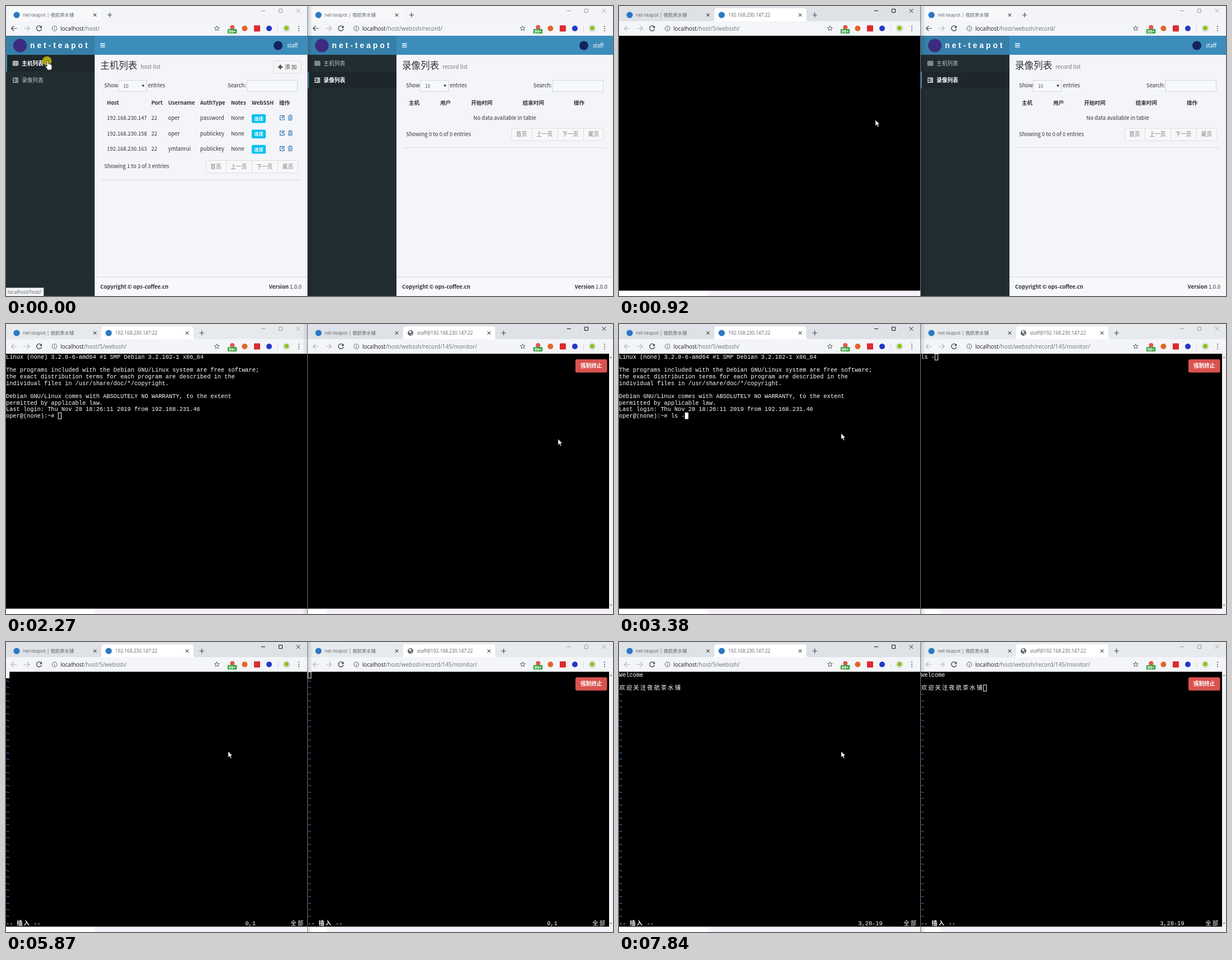
Write an HTML page that moves like this. It is 1082 px wide and 517 px high and loops after 8 s.

```html
<!DOCTYPE html>
<html lang="zh">
<head>
<meta charset="utf-8">
<title>Web terminal</title>
<style>
html, body { margin: 0; width: 100%; height: 100%; overflow: hidden; background: #fff; }
svg { display: block; width: 100%; height: 100%; }
text { white-space: pre; font: 9.5px "Noto Sans CJK SC", "Noto Sans CJK JP", "Noto Sans CJK", sans-serif; }
.ui { font-family: "Open Sans", "Noto Sans CJK SC", "Noto Sans CJK JP", sans-serif; }
.brand { font-family: "Liberation Sans", sans-serif; font-weight: 700; letter-spacing: 4px; }
.mono { font: 10.3px "Liberation Mono", "Noto Sans CJK SC", "Noto Sans CJK JP", monospace; }
.wide { letter-spacing: 2.06px; }
.b { font-weight: 700; }
.l { font-weight: 300; }
</style>
</head>
<body>
<svg id="stage" viewBox="0 0 1082 517" preserveAspectRatio="none"></svg>
<script>
const LOOP = 8000, SPLIT = 538, CELL = 6.18, ROW = 11.65;
const BRAND = 'net-teapot', CLUB = '夜航茶水铺', USER = 'staff', HOST = '192.168.230.147';
const PROMPT = 'oper@(none):~# ', FILE = 'ops-coffee', GREETING = '欢迎关注' + CLUB;
const PINYIN = "huan'ying'guan'zhu'ye'hang'cha'shui'pu".split("'");

const BANNER = [
  'Linux (none) 3.2.0-6-amd64 #1 SMP Debian 3.2.102-1 x86_64',
  '',
  'The programs included with the Debian GNU/Linux system are free software;',
  'the exact distribution terms for each program are described in the',
  'individual files in /usr/share/doc/*/copyright.',
  '',
  'Debian GNU/Linux comes with ABSOLUTELY NO WARRANTY, to the extent',
  'permitted by applicable law.',
  'Last login: Thu Nov 28 18:26:11 2019 from 192.168.231.46'
];

// time, x, y, shape: 0 arrow, 1 hand, 2 hand while clicking, 3 arrow while clicking
const POINTER = [
  [0, 73, 98, 2], [90, 73, 98, 1], [160, 95, 108, 1], [230, 180, 130, 0], [300, 310, 165, 0],
  [370, 415, 192, 0], [440, 451, 199, 1], [590, 451, 199, 2], [670, 451, 199, 0], [750, 457, 203, 0],
  [1070, 470, 200, 0], [1150, 520, 180, 0], [1230, 575, 155, 0], [1300, 602, 138, 0], [1380, 612, 130, 1],
  [1460, 612, 130, 2], [1530, 660, 100, 0], [1600, 709, 69, 2], [1660, 712, 69, 1], [1730, 720, 70, 0],
  [1810, 775, 95, 0], [1880, 860, 140, 0], [1960, 940, 185, 0], [2040, 982, 203, 1], [2110, 984, 204, 2],
  [2190, 984, 205, 0], [2350, 960, 206, 0], [2430, 850, 204, 0], [2520, 700, 202, 0], [2600, 570, 200, 0],
  [2820, 396, 195, 3], [2890, 396, 195, 0]
];
const SIDEBAR = [[0, 158], [1640, 115], [1730, 84], [1810, 50], [1880, 34]];
const LIST_CMD = [[0, ''], [3120, 'l'], [3290, 'ls'], [3370, 'ls -'], [3460, 'ls -lh']];
const EDIT_CMD = [[0, ''], [4240, 'v'], [4320, 'vi '], [4470, 'vi o'], [4540, 'vi ops']];
[...'-coffee'].forEach((c, i) => EDIT_CMD.push([4760 + i * 81, EDIT_CMD.at(-1)[1] + c]));
const WELCOME = [[0, ''], [6010, 'W'], [6180, 'We'], [6258, 'Wel'], [6335, 'Welc'], [6412, 'Welco'], [6490, 'Welcome']];

const at = (table, t) => table.findLast(k => k[0] <= t);
const rect = (x, y, w, h, fill, more = '') => `<rect x="${x}" y="${y}" width="${w}" height="${h}" fill="${fill}" ${more}/>`;
const dot = (x, y, r, fill, more = '') => `<circle cx="${x}" cy="${y}" r="${r}" fill="${fill}" ${more}/>`;
const line = (d, color, w = 1) => `<path d="${d}" fill="none" stroke="${color}" stroke-width="${w}"/>`;
const shape = (d, fill, more = '') => `<path d="${d}" fill="${fill}" ${more}/>`;
const text = (x, y, s, fill = '#333', size = 9.5, cls = '', anchor = 'start') =>
  `<text x="${x}" y="${y}" fill="${fill}" class="${cls}" style="font-size:${size}px" text-anchor="${anchor}">${s}</text>`;
const move = (x, y, s) => `<g transform="translate(${x} ${y})">${s}</g>`;
const cross = (x, y, r, color, w = 1) => line(`M${x - r} ${y - r}l${2 * r} ${2 * r}m0 ${-2 * r}l${-2 * r} ${2 * r}`, color, w);
const plus = (x, y, r, color, w = 1.2) => line(`M${x - r} ${y}h${2 * r}M${x} ${y - r}v${2 * r}`, color, w);

function star(x, y) {
  const p = [...Array(10)].map((_, i) => {
    const a = i * Math.PI / 5, r = i % 2 ? 2 : 4.6;
    return `${(x + r * Math.sin(a)).toFixed(1)} ${(y - r * Math.cos(a)).toFixed(1)}`;
  });
  return line(`M${p.join('L')}Z`, '#5f6368', 1);
}

// Browser frame: tab strip, window buttons, toolbar
function chrome(W, o) {
  const strip = o.active ? '#dee1e6' : o.pale ? '#f2f4f7' : '#e7eaed';
  const btn = o.active ? '#111' : '#999', ink = '#45494d', off = '#b4b7ba';
  const tx = o.second ? 170 : 6, r = W - 537;
  let s = rect(0, 0, W, 53, '#f3f5f8') + rect(0, 0, W, 27, strip);
  s += shape(`M${tx - 4} 27q4 0 4 -4v-14q0 -5 5 -5h154q5 0 5 5v14q0 4 4 4z`, o.pale && !o.active ? '#f7f8fa' : '#fff');
  s += dot(19, 16, 5.6, '#2b78c5') + text(30, 19, `${BRAND} | ${CLUB}`, '#5f6368', 8.3, 'ui') + cross(158.5, 16, 2.7, ink, 1.1);
  if (o.second) {
    s += o.globe ? dot(183, 16, 5, '#5f6368') + shape('M180 13l3 -1 2 2 -3 3zM183 18l3 -1 -1 3z', '#fff') : dot(183, 16, 5.6, '#2b78c5');
    s += text(194.5, 19, o.second, '#5f6368', 8.3, 'ui') + cross(323, 16, 2.7, ink, 1.1);
  }
  s += plus(o.second ? 349 : 185, 16, 4.2, ink);
  s += line(`M${W - 82} 8.5h7`, btn) + line(`M${W - 50.5} 5.5h6v6h-6z`, btn) + cross(W - 16, 8.5, 3.4, btn, .9);
  const arrow = (x, d, c) => line(`M${x + 5 * d} 40h${-10 * d}m${4.5 * d} -4.5l${-4.5 * d} 4.5 ${4.5 * d} 4.5`, c, 1.2);
  s += arrow(14.5, 1, o.second ? off : ink) + arrow(37, -1, off);
  s += line('M62.7 37.2a4.5 4.5 0 1 0 .8 3.6', ink, 1.3) + shape('M64 35v4.3h-4.3z', ink);
  s += dot(86.5, 40, 4.4, 'none', 'stroke="#5f6368"') + rect(86, 39.4, 1.1, 3, '#5f6368') + rect(86, 37.4, 1.1, 1.1, '#5f6368');
  s += text(97, 43.5, `localhost<tspan fill="#6b7075">${o.path}</tspan>`, '#202124', 10, 'ui');
  s += move(r, 0, star(376, 40) + dot(403.5, 38, 4, '#e2574c') + rect(395, 41, 16.5, 8, '#3ba345', 'rx="1.5"') +
    text(403.2, 47.8, '99+', '#fff', 7.6, 'ui b', 'middle') + dot(425.5, 40, 5, '#e2662a') + rect(442, 34.5, 11, 11, '#dd2a30', 'rx="1"') +
    dot(469, 40, 5, '#2238c8') + rect(484, 35, 1, 11, '#d5d8db') + dot(500, 40, 6.8, '#dfe2e4') + dot(500, 39.5, 4, '#8fc31f') +
    [36, 40, 44].map(y => dot(522, y, 1.1, '#5f6368')).join(''));
  return s;
}

const gridIcon = c => line('M12.5 98.5h9v7.5h-9zM12.5 101h9M12.5 103.5h9M15.5 98.5v7.5M18.5 98.5v7.5', c, 1);
const indentIcon = c => line('M12 128.5h10M16.5 131h5.5M16.5 133.5h5.5M12 136h10', c, 1.3) + shape('M12 130l3 2.2 -3 2.3z', c);
const button = (x, y, w, label, fill) => rect(x, y, w, 15.5, fill, 'rx="2"') + text(x + w / 2, y + 10.8, label, '#fff', 8.2, 'b', 'middle');

// Layout shared by both lists
function listPage(W, side, o) {
  const x = side, full = side === 158, px = W - 181, py = o.pageY;
  let s = rect(0, 53, W, 464, '#f4f5f9') + rect(0, 53, W, 34, '#3c8dbc') + rect(0, 53, side, 34, '#367fa9') + rect(0, 87, side, 430, '#222d32');
  s += dot(full ? 25 : side / 2, 70.5, 12, '#3d2b80');
  if (full) s += text(43, 75, BRAND, '#fff', 13.75, 'brand');
  s += line(`M${x + 10} 67.3h8.5m-8.5 2.9h8.5m-8.5 2.9h8.5`, '#fff', 1.4);
  s += dot(W - 52, 70.5, 8, '#14235c') + text(W - 36, 73.7, USER, '#fff', 9.6);
  s += rect(0, o.item ? 117 : 87, side, 30, '#1e282c') + rect(0, o.item ? 117 : 87, 2, 30, '#3c8dbc');
  const tint = i => i === o.item ? '#fff' : '#b8c7ce';
  s += gridIcon(tint(0)) + indentIcon(tint(1));
  if (full) ['主机列表', '录像列表'].forEach((n, i) => s += text(28, 105.7 + 30 * i, n, tint(i), 9.7, i === o.item ? 'b' : ''));
  s += text(x + 10, 112, o.title, '#333', 16.5) + text(x + 82, 111.8, o.sub, '#777', 9.7, 'l');
  s += text(x + 17, 145, 'Show') + rect(x + 42.5, 132.5, 50, 20, '#f7f8fb', 'stroke="#d2d6de"') + text(x + 51, 146.2, '10', '#555', 8.3);
  s += shape(`M${x + 84} 140.5h5l-2.5 4z`, '#333') + text(x + 95, 145, 'entries');
  s += text(W - 142, 145, 'Search:') + rect(W - 107.5, 132.5, 90, 20, '#f7f8fb', 'stroke="#d2d6de"');
  s += text(x + 17, py + 14.2, o.info) + rect(px + .5, py + .5, 163.5, 22, '#f8f8fa', 'stroke="#ddd" rx="2"');
  s += line(`M${px + 36.5} ${py}v22m46 0v-22m46 0v22`, '#ddd');
  ['首页', '上一页', '下一页', '尾页'].forEach((n, i) => s += text(px + [18, 59, 105, 146.5][i], py + 14.5, n, '#777', 9.7, '', 'middle'));
  s += rect(x + 11, py + 34.5, W - x - 22, 1, '#d8dbe2') + rect(x, 483, W - x, 34, '#f7f8fb') + rect(x, 483, W - x, 1, '#d2d6de');
  s += text(x + 10, 503.5, 'Copyright © ops-coffee.cn', '#333', 9.5, 'b') +
    text(W - 10, 503.5, '<tspan font-weight="700">Version</tspan> 1.0.0', '#333', 9.5, '', 'end');
  return s;
}

const status = (w, s) => rect(0, 502.5, w, 15, '#f3f4f6', 'stroke="#c8cbd0" stroke-width=".6"') + text(3, 513.3, s, '#5f6368', 8.6, 'ui');

function hostPage(t) {
  const cols = [180, 259, 289, 346, 401, 438, 487], ink = '#337ab7';
  let s = listPage(537, 158, { item: 0, title: '主机列表', sub: 'host list', pageY: 275, info: 'Showing 1 to 3 of 3 entries' });
  s += rect(476.5, 97.5, 50, 22.5, '#f4f4f4', 'stroke="#ddd" rx="2"') + plus(489, 108.7, 4, '#444', 2.4) + text(497, 112.3, '添 加', '#444', 9.6);
  ['Host', 'Port', 'Username', 'AuthType', 'Notes', 'WebSSH', '操作'].forEach((n, i) => s += text(cols[i], 176, n, '#333', 9.5, 'b'));
  [[HOST, 'oper', 'password'], ['192.168.230.158', 'oper', 'publickey'], ['192.168.230.163', 'ymtanrui', 'publickey']].forEach(([ip, name, auth], i) => {
    const dy = i * 27.4;
    [ip, 22, name, auth, 'None'].forEach((v, k) => s += text(cols[k], 203.2 + dy, v));
    s += button(438, 193 + dy, 25, '连接', '#00c0ef');
    s += move(0, dy, line('M494 195.5h-5.5v7.5h7.5v-4', ink, 1.2) + line('M491.5 200l5 -5', ink, 1.8) +
      line('M502.5 196h8.5M505.5 195.5v-1.2h2.6v1.2M503.7 197v6.5h6v-6.5M505.7 197.5v5M507.8 197.5v5', ink, 1));
  });
  return s + (t < 230 ? status(67, 'localhost/host/') : '');
}

const OPEN = [180, 262, 300, 372, 446], MID = [107, 214, 258, 350, 443], SLIM = [57, 177, 230, 332, 434];
const mix = (a, b, k) => a.map((v, i) => v + (b[i] - v) * k);

function recordPage(t) {
  const side = at(SIDEBAR, t)[1], loaded = t >= 1530, wrap = loaded && side > 120, step = wrap ? 40 : 27.6;
  const cols = !loaded ? [180, 236, 291, 383, 474] : side > 84 ? mix(MID, OPEN, (side - 84) / 74) : mix(SLIM, MID, (side - 34) / 50);
  let s = listPage(544, side, {
    item: 1, title: '录像列表', sub: 'record list', pageY: loaded ? 247 + (wrap ? 25 : 0) : 217.5,
    info: loaded ? 'Showing 1 to 2 of 2 entries' : 'Showing 0 to 0 of 0 entries'
  });
  ['主机', '用户', '开始时间', '结束时间', '操作'].forEach((n, i) => s += text(cols[i], 176, n, '#333', 9.5, 'b'));
  if (!loaded) return s + text(351, 203, 'No data available in table', '#333', 9.5, '', 'middle');
  [['55', '55', '监控', '#f39c12', '强制结束', '#dd4b39'], ['10', '34', '播放', '#00a65a', '命令提取', '#00c0ef']].forEach((r, i) => {
    const y = 203.2 + i * step, day = '2019-11-28';
    s += text(cols[0], y, HOST + ':22') + text(cols[1], y, USER);
    [0, 1].forEach(k => {
      const clock = '18:26:' + r[k], x = cols[2 + k];
      s += wrap ? text(x, y, day) + text(x, y + 13, clock) : text(x, y, `${day} ${clock}`);
    });
    s += button(cols[4], y - 10.2, 25.5, r[2], r[3]) + button(cols[4] + 33, y - 10.2, 41, r[4], r[5]);
  });
  return s + (t >= 1600 && t < 1810 ? status(134, 'localhost/host/webssh/record/#') : '');
}

// Terminal cells
const rowY = n => 62 + ROW * n;
const width = s => [...s].reduce((n, c) => n + (c > '\u2e7f' ? 2 : 1), 0);
function cells(col, row, s, fill = '#fff', cls = '') {
  let out = '', x = col;
  for (const part of s.match(/[\u2e80-\uffff]+|[^\u2e80-\uffff]+/g) || []) {
    const wide = part[0] > '\u2e7f';
    out += text((x * CELL + (wide ? .6 : 0)).toFixed(2), rowY(row).toFixed(2), part, fill, 10.3, `mono ${wide ? 'wide ' : ''}${cls}`);
    x += width(part);
  }
  return out;
}
const caret = (col, row, solid) => solid ? rect(col * CELL, 53 + ROW * row, 6.2, 11.6, '#fff')
  : rect(col * CELL + .5, 53.3 + ROW * row, 5.3, 11, 'none', 'stroke="#fff"');
const prompt = (cmd = '') => PROMPT + cmd;

function editor(t, left) {
  const word = at(WELCOME, t)[1], third = t >= 6660, done = t >= 7590, insert = t >= 5870;
  let s = cells(0, 0, word) + (done ? cells(0, 2, GREETING) : '');
  for (let r = third ? 3 : 1; r < 38; r++) s += cells(0, r, '~', '#4d8fd0');
  s += insert ? cells(0, 38, '--') + cells(3, 38, '插入', '#fff', 'b') + cells(8, 38, '--') : cells(0, 38, `"${FILE}" [新文件]`);
  s += cells(69, 38, done ? '3,28-19' : third ? '3,1' : word ? '1,' + (word.length + 1) : insert ? '0,1' : '0,0-1') + cells(82, 38, '全部');
  if (!left || t < 7840) s += caret(done ? width(GREETING) : third ? 0 : word.length, third ? 2 : 0, left);
  return s;
}

function inputPanel(t) {
  if (t < 6950 || t >= 7590) return '';
  const n = Math.min(9, 2 + Math.floor((t - 6950) / 68)), w = 120 + 23 * n;
  return rect(.5, 90.5, w, 40, '#fff', 'stroke="#b9c4d0"') + text(8, 104, PINYIN.slice(0, n).join("'"), '#333', 11) +
    rect(6, 109, w - 12, 1, '#e3e7ec') + text(8, 124, `<tspan fill="#d8412f">1.${GREETING.slice(0, n)}</tspan>  2.欢迎  3.换  4.环`, '#333', 11);
}

function shellLeft(t) {
  if (t < 1000) return '';
  if (t >= 5400) return editor(t, true) + inputPanel(t);
  const rows = [...BANNER, prompt(at(LIST_CMD, t)[1])];
  if (t >= 3540) rows.push('总用量 0', prompt());
  if (t >= 4010) rows.push(prompt(), prompt(at(EDIT_CMD, t)[1]));
  const focus = t < 1460 || t >= 2820, blink = t >= 3860 && t < 4010;
  return rows.map((r, i) => cells(0, i, r)).join('') + (blink ? '' : caret(rows.at(-1).length, rows.length - 1, focus));
}

function shellRight(t) {
  if (t >= 5480) return editor(t, false);
  const cmd = at(LIST_CMD, t)[1], rows = [cmd];
  if (t >= 3540) rows.push('总用量 0', prompt());
  if (t >= 4010) rows.push(prompt(), prompt(at(EDIT_CMD, t)[1]));
  return rows.map((r, i) => cells(0, i, r)).join('') + (cmd && t < 3540 ? caret(cmd.length, 0, false) : '');
}

const termPage = (W, w, side, body) => rect(0, 53, W, 464, '#fff') + rect(side, 507, W - side, 10, '#f7f2fa') + rect(0, 53, w, 454.5, '#000') + body;

function monitorPage(t) {
  let s = termPage(544, 537, 34, shellRight(t)) + rect(537, 53, 7, 455, '#f3f3f5');
  s += shape('M538.5 60.5h4l-2 -2.5zM538.5 500.5h4l-2 2.5z', '#666');
  if (t >= 2270) s += rect(477, 63, 56.5, 23.5, '#d9534f', 'rx="2.5"') + text(505.2, 78.3, '强制终止', '#fff', 9.7, 'b', 'middle');
  return s;
}

function pointer(t) {
  const [, x, y, kind] = at(POINTER, t);
  const hand = kind === 1 || kind === 2;
  const ring = kind > 1 ? dot(0, 0, 8.3, '#e6d200', 'opacity=".72"') : '';
  const body = hand
    ? 'M0 .5q1.5 -1.5 2.6 0v5q2 -.8 2.4 .5 1.8 -.5 2.2 .8 1.6 0 1.6 1.6v4q-.6 2 -1.4 3.6h-6q-1.6 -3 -4.4 -6.4 .4 -1.6 3 .4z'
    : 'M0 0v10.6l2.5 -2.2 1.8 4 1.8 -.8 -1.8 -3.9h3.4z';
  return move(x, y, ring + shape(body, '#fff', 'stroke="#222" stroke-width=".7" stroke-linejoin="round"'));
}

function draw(t) {
  const ssh = t >= 670, monitor = t >= 2190, rightOn = t >= 1460 && t < 2820, leftOn = t >= 90 && !rightOn;
  const left = chrome(537, { active: leftOn, pale: t < 1460, second: ssh && HOST + ':22', path: ssh ? '/host/5/webssh/' : '/host/' }) +
    (ssh ? termPage(537, 537, 158, shellLeft(t)) : hostPage(t));
  const right = chrome(544, {
    active: rightOn, pale: t < 1460, second: monitor && `${USER}@${HOST}:22`, globe: true,
    path: monitor ? '/host/webssh/record/145/monitor/' : '/host/webssh/record/'
  }) + (monitor ? monitorPage(t) : recordPage(t));
  let edge = '';
  for (let i = 0; i < 8; i++) edge += rect(rightOn ? 536 - i : 538 + i, 0, 1, 517, '#000', `opacity="${(.13 * (1 - i / 8)).toFixed(3)}"`);
  return left + move(SPLIT, 0, right) + edge + rect(537, 0, 1, 517, '#767b80') + pointer(t);
}

const stage = document.getElementById('stage'), start = performance.now();
let last = '';
function tick() {
  const next = draw((performance.now() - start) % LOOP);
  if (next !== last) stage.innerHTML = last = next;
  requestAnimationFrame(tick);
}
tick();
</script>
</body>
</html>
```
